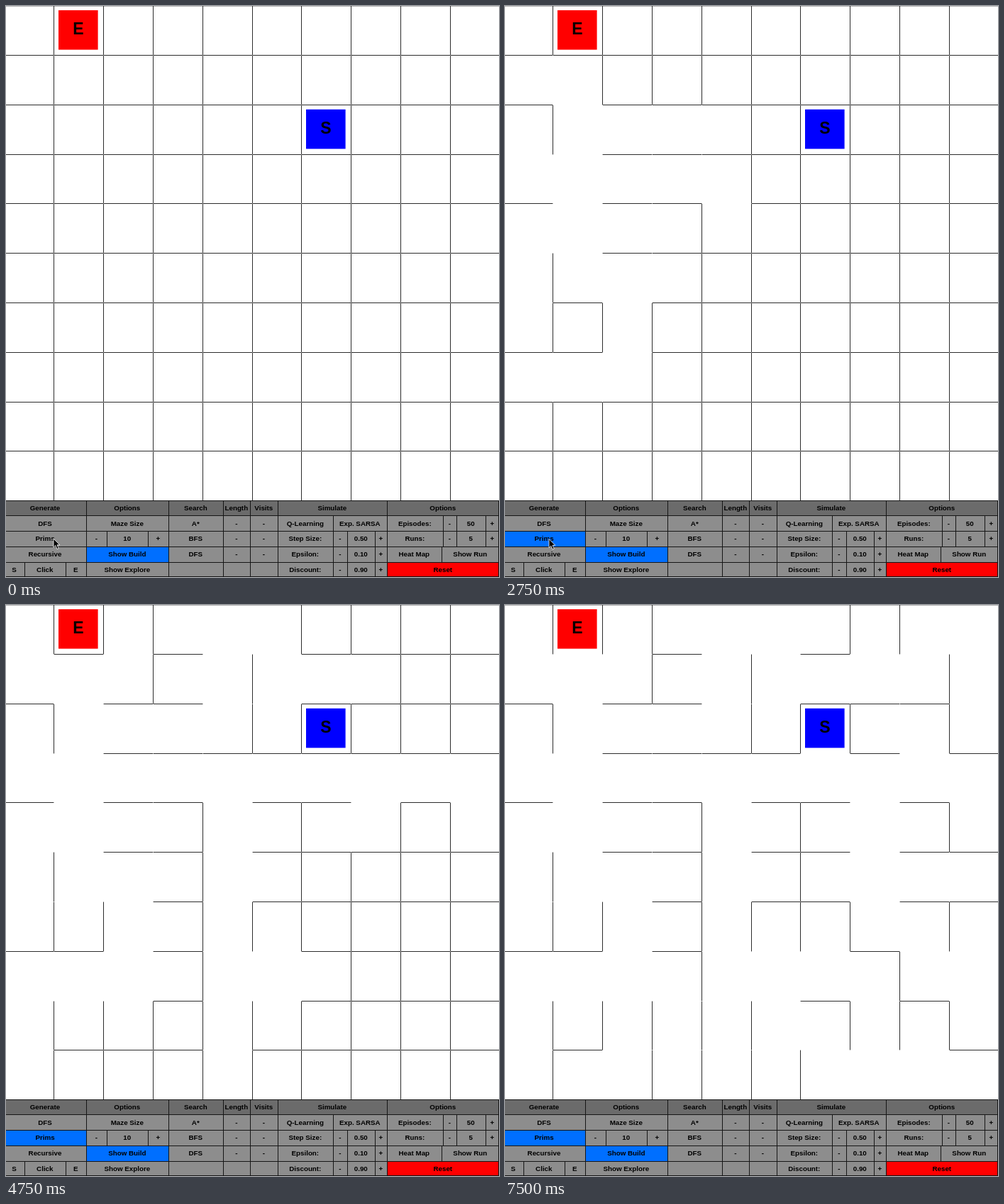
Animation of 695 by 805 pixels, one loop 8 s. Source, as an HTML page:

```html
<!DOCTYPE html>
<html lang="en">
<head>
<meta charset="utf-8">
<title>Maze builder</title>
<style>
html, body { margin: 0; width: 100%; height: 100%; overflow: hidden; background: #fff; }
svg { display: block; }
text { font: bold 9.8px "Liberation Sans", Arial, sans-serif; text-anchor: middle; }
.big { font-size: 23px; }
</style>
</head>
<body>
<svg id="stage" width="695" height="805" viewBox="0 0 695 805"></svg>
<script>
const stage = document.getElementById('stage');
const TICK = 250, LOOP = 8000, FIRST = 5;
const N = 10, PITCH = 69.8;
const CELL = '#8d8d8d', HEAD = '#6b6b6b', BLUE = '#006fff';
const LINE = '#2c2c2c', CROSS = '#a8a8a8', EDGE = '#161616';

function add(tag, attrs, text) {
  const el = document.createElementNS('http://www.w3.org/2000/svg', tag);
  for (const k in attrs) el.setAttribute(k, attrs[k]);
  if (text) el.textContent = text;
  return stage.appendChild(el);
}
const rect = (x, y, width, height, fill) => add('rect', { x, y, width, height, fill });

// Maze walls: v = right side of a cell, h = underside, then row and column.
const gx = k => k ? Math.round(PITCH * k - 2.35) : -1;
const gy = k => k ? Math.round(PITCH * k - .75) : -1;
const walls = {};
function wall(id, x, y, w, h) {
  const g = add('g', {});
  g.append(rect(x, y, w, h, CROSS),
    w > h ? rect(x + 1, y, w - 2, 1, LINE) : rect(x, y + 1, 1, h - 2, LINE));
  walls[id] = g;
}
rect(0, 0, 695, 805, '#fff');
rect(0, 0, 695, 1, '#b4b4b4');
for (let r = 0; r < N; r++) {
  for (let c = 0; c < N; c++) {
    if (c < N - 1) wall('v' + r + c, gx(c + 1), gy(r), 1, gy(r + 1) - gy(r) + 1);
    if (r < N - 1) wall('h' + r + c, gx(c), gy(r + 1), gx(c + 1) - gx(c) + 1, 1);
  }
}

// Walls opened at each tick.
const opened = [
  'v40', 'h31 h40', 'v31 h41',
  'v30 v41 v51 v32 h21', 'v21 h52 v42 v22 v33', 'h20 h11 h62 v52 h50', 'v23 h34 v10 v71 v70',
  'h44 v11 h00 v62 h14', 'h54 h04 v04 v72 h51', 'v03 v13 h02 v34 v44',
  'h05 v35 h64 v54 h70', 'v15 h15 v36 h74 v74', 'v37 h65 h37 h84 h71',
  'v16 v38 v75 h80', 'h39 v46 h75 h72',
  'h47 v05 v17 h01 h73', 'v56 h26 h82 h07 h66', 'v57 h28 h08 v91 v47',
  'v27 v58 h57 v08 h83', 'h09 h85 v67 v76 h68', 'h19 v78 v85 h77 h79',
  'h69 h86 v96 h87 v97', 'v98 h88'
].map(s => s.split(' '));

function marker(x, y, fill, letter) {
  rect(x, y, 55.6, 55.6, fill);
  add('text', { x: x + 27.8, y: y + 34.4, class: 'big' }, letter);
}
marker(74, 6, '#f00', 'E');
marker(423, 145.8, '#00f', 'S');

// Control panel
const ROW = 21.75, TOP = 697;
const rowY = r => Math.floor(TOP + ROW * r);
const fills = { 'Show Build': BLUE, Reset: '#f00' };
const buttons = {};
function row(r, edges, labels) {
  const y = rowY(r), h = rowY(r + 1) - y;
  labels.split('|').forEach((label, i) => {
    const x = edges[i], w = edges[i + 1] - x;
    buttons[label] = rect(x, y, w, h, fills[label] || (r ? CELL : HEAD));
    rect(x, y, w, 1, EDGE);
    if (x) rect(x, y, 1, h, EDGE);
    add('text', { x: x + w / 2 - (x ? .2 : 1.5), y: TOP + ROW * r + 13.8 }, label);
  });
}
const search = [229, 306, 344];
const stepper = [383, 461, 481, 520];
const counter = [537, 616, 635, 676, 695];
row(0, [0, 113, ...search, 383, 537, 695], 'Generate|Options|Search|Length|Visits|Simulate|Options');
row(1, [0, 113, ...search, 383, 461, ...counter], 'DFS|Maze Size|A*|-|-|Q-Learning|Exp. SARSA|Episodes:|-|50|+');
row(2, [0, 113, 142, 200, ...search, ...stepper, ...counter], 'Prims|-|10|+|BFS|-|-|Step Size:|-|0.50|+|Runs:|-|5|+');
row(3, [0, 113, ...search, ...stepper, 537, 614, 695], 'Recursive|Show Build|DFS|-|-|Epsilon:|-|0.10|+|Heat Map|Show Run');
row(4, [0, 26, 84, 113, ...search, ...stepper, 537, 695], 'S|Click|E|Show Explore||||Discount:|-|0.90|+|Reset');
rect(694, TOP, 1, 108, EDGE);
rect(0, 804, 695, 1, EDGE);

const cursor = add('path', {
  d: 'M0 0V12.2L2.8 9.6L5 14.6L7.2 13.6L5 8.8H8.8Z',
  fill: '#000', stroke: '#fff', 'stroke-width': .8
});

function cursorAt(t) {
  if (t < 1250) return [67, 751];
  if (t < 3000) return [62, 751.5];
  return t < 3250 ? [62, 770] : null;
}

function draw(now) {
  const t = now % LOOP, tick = Math.floor(t / TICK) - FIRST;
  opened.forEach((ids, i) => {
    for (const id of ids) walls[id].style.display = i <= tick ? 'none' : '';
  });
  buttons.Prims.setAttribute('fill', t < 750 ? CELL : BLUE);
  const p = cursorAt(t);
  cursor.style.display = p ? '' : 'none';
  if (p) cursor.setAttribute('transform', `translate(${p})`);
}

let start;
function frame(now) {
  start ??= now;
  draw(now - start);
  requestAnimationFrame(frame);
}
draw(0);
requestAnimationFrame(frame);
</script>
</body>
</html>
```
